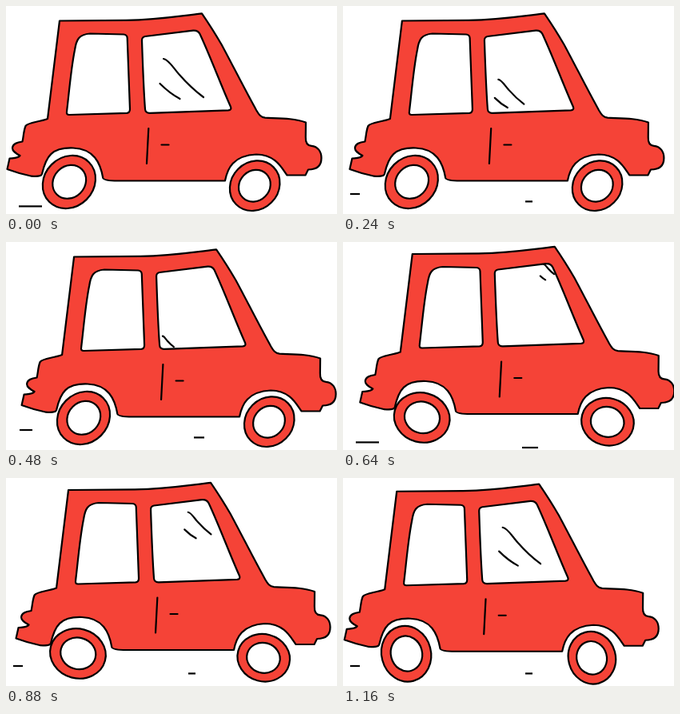
An HTML page with a canvas for the animation above (1200 ms loop, 414x260 px).

```html
<!DOCTYPE html>
<html lang="en">
<head>
<meta charset="utf-8">
<title>Bouncing car</title>
<style>
  html, body { margin: 0; width: 100%; height: 100%; overflow: hidden; background: #fff; }
  canvas { display: block; }
</style>
</head>
<body>
<canvas id="stage" width="414" height="260"></canvas>
<script>
const ctx = document.getElementById('stage').getContext('2d');
const LOOP = 1200, TICK = 40, BOUNCE = 240, DASH = 300;
const RED = '#f54337';

const body = new Path2D(`M67 18.5 L150 17.8 C190 17 205 14 245 9.3
  C253 21 262 35 269.5 48 C283 73 299 105 313 130 C316 135 318 139 324 139.7
  C342 140.5 360 140 375 145.5 L374.8 164 C374.5 171 377 174.5 382 174.8
  C390 175.5 394.5 182 394.5 190 C394.5 199 390 204.5 378 204.5 L374.5 211.5 L351.5 211.5
  C345 203 338 186 313 185.5 C284 187 277 203 274 218.3
  L140 218.5 C128 218.5 122 217 121.3 215 C118 196 110 178.5 84 177.5
  C57 176.5 50 188 45 210 C44 213.5 38 213 31 212.5 C21 210.5 11 207.5 1.5 204
  L4.5 190.5 C10 190 15 190.5 17.5 187 C12 184 8 181.5 8 177.5
  C8.5 172 14 170.5 20.5 169.5 C22 163 22 156 24.5 150 C28 145 40 145.5 52 141 Z`);

const rearWindow = new Path2D(`M105 34.5 L147 35.5 Q151.5 36 151.7 40
  L155 129 Q155 133.5 151 133.8 L79 136 Q75.3 136 76 132
  C79 108 81 80 86 55 C88 42 91 35.5 105 34.5 Z`);

const frontWindow = new Path2D(`M174 38 L234 30.6 Q240 30 242.5 35
  C256 64 268 97 281 126 Q282.5 130 278 130.3 L180 133.8 Q174.5 134 174 129
  C172 103 171 73 170 43 Q170 38.6 174 38 Z`);

const mix = (a, b, k) => a + (b - a) * k;

function line(x1, y1, x2, y2) {
  ctx.beginPath();
  ctx.moveTo(x1, y1);
  ctx.lineTo(x2, y2);
  ctx.stroke();
}

function shape(path, fill) {
  ctx.fillStyle = fill;
  ctx.fill(path);
  ctx.stroke(path);
}

function oval(x, y, rx, ry, angle, fill) {
  const path = new Path2D();
  path.ellipse(x, y, rx, ry, angle, 0, Math.PI * 2);
  shape(path, fill);
}

// Reflection slides down the windscreen; it restarts small at the top halfway
function drawGlint(t) {
  const late = t >= LOOP / 2;
  const k = (t % (LOOP / 2)) / (LOOP / 2);
  const x = late ? mix(234, 197, k) : mix(197, 173, k);
  const y = late ? mix(29, 66, k) : mix(66, 130.5, k);
  const s = late ? mix(0.2, 1, k) : mix(1, 0.1, k);
  const at = (px, py) => [x + px * s, y + py * s];
  const low = (px, py) => [x - 4.5 + px * s, y + 9 + (22 + py) * s];
  ctx.save();
  ctx.clip(frontWindow);
  ctx.beginPath();
  ctx.moveTo(...at(0, 0));
  ctx.bezierCurveTo(...at(7, 1), ...at(14, 14), ...at(20, 20));
  ctx.quadraticCurveTo(...at(34, 36), ...at(50, 48));
  ctx.moveTo(...low(0, 0));
  ctx.quadraticCurveTo(...low(12, 12), ...low(25, 19));
  ctx.stroke();
  ctx.restore();
}

function drawCar(t, dx, swing) {
  ctx.save();
  ctx.translate(dx, -5.25 * swing);
  shape(body, RED);
  shape(rearWindow, '#fff');
  shape(frontWindow, '#fff');
  drawGlint(t);
  line(178.3, 153, 176, 197);
  line(194.5, 173.5, 203.5, 173.5);
  ctx.restore();
}

function drawWheels(dx, swing) {
  const angle = -Math.PI / 4 - Math.PI * swing;
  const y = 220 - 0.8 * swing;
  oval(78.9 + dx, y, 35.1, 30.9, angle, RED);
  oval(79.2 + dx, y - 0.2, 22.2, 19.6, angle, '#fff');
  oval(311.2 + dx, 224.7, 33, 29.5, angle, RED);
  oval(310.9 + dx, 224.8, 20.9, 18.8, angle, '#fff');
}

// Each pose: left dash x1, x2, y, then right dash x1, x2, y
const dashes = [
  [16, 45, 250.4, 224, 244, 257],
  [7, 30, 250.4, 216, 229, 257],
  [17, 33, 235, 235, 248, 244.4],
  [9, 21, 235, 228, 237, 244.4]
];

function drawDashes(t) {
  const phase = t % DASH;
  const [a, b, y, c, d, z] = dashes[Math.floor(phase / DASH * dashes.length)];
  ctx.lineCap = 'butt';
  line(a, y, b, y);
  if (phase > 10) line(c, z, d, z);
  ctx.lineCap = 'round';
}

function draw(t) {
  ctx.fillStyle = '#fff';
  ctx.fillRect(0, 0, 414, 260);
  ctx.strokeStyle = '#000';
  ctx.lineWidth = 2.2;
  ctx.lineJoin = 'round';
  const dx = 10 * (1 - Math.cos(t / LOOP * Math.PI * 2));
  const beat = (t % BOUNCE) / BOUNCE;
  const swing = 1 - Math.abs(1 - 2 * beat);
  drawDashes(t);
  drawCar(t, dx, swing);
  drawWheels(dx, swing);
}

const start = performance.now();
function tick() {
  const t = (performance.now() - start) % LOOP;
  draw(Math.floor(t / TICK) * TICK);
  requestAnimationFrame(tick);
}
tick();
</script>
</body>
</html>
```
